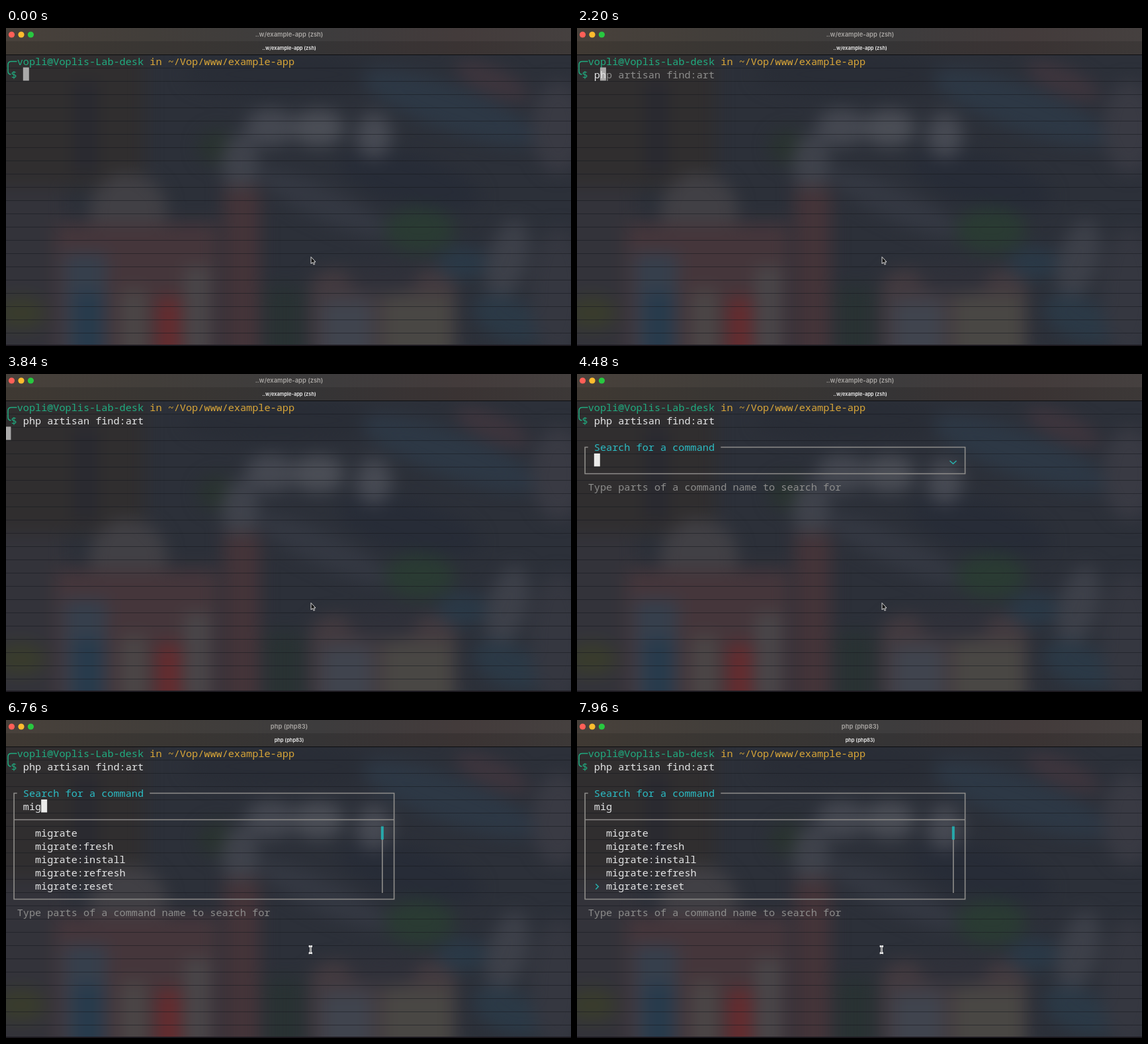
An HTML page that plays this animation: 854 px wide and 480 px high, repeating every 8 s.

```html
<!DOCTYPE html>
<html lang="en">
<head>
<meta charset="utf-8">
<title>Terminal</title>
<style>
  html, body { margin: 0; width: 100%; height: 100%; overflow: hidden; background: #2c3039; }
  svg { display: block; width: 854px; height: 480px; }
  text { white-space: pre; }
  .mono text { font: 15.2px "Noto Sans Mono", "DejaVu Sans Mono", monospace; fill: #e4e5e6; }
  .mono .green { fill: #20ac80; }
  .mono .gold { fill: #d9a638; }
  .mono .cyan { fill: #2bbcc4; }
  .mono .dim { fill: #8d8d8c; }
  .bar text { font-family: Inter, sans-serif; font-weight: 600; text-anchor: middle; }
  .line { fill: none; stroke: #8e8d8a; stroke-width: 1.6; }
  .mark { fill: none; stroke: #27b3ae; stroke-width: 1.5; }
</style>
</head>
<body>
<svg viewBox="0 0 854 480">
  <defs>
    <filter id="soft" filterUnits="userSpaceOnUse" x="-80" y="-40" width="1014" height="600" color-interpolation-filters="sRGB">
      <feGaussianBlur stdDeviation="13"/>
    </filter>
    <linearGradient id="top">
      <stop offset="0" stop-color="#48413b"/>
      <stop offset=".25" stop-color="#423e3a"/>
      <stop offset=".55" stop-color="#3d3c3d"/>
      <stop offset=".8" stop-color="#433b3b"/>
      <stop offset="1" stop-color="#45403f"/>
    </linearGradient>
    <pattern id="rows" width="854" height="20" patternUnits="userSpaceOnUse">
      <path d="M0 .5H854" stroke="#14161c" stroke-opacity=".5"/>
    </pattern>
  </defs>

  <rect width="854" height="480" fill="#2c3039"/>
  <g filter="url(#soft)">
    <rect x="-60" y="-20" width="270" height="260" fill="#302e2f"/>
    <rect x="105" y="80" width="32" height="140" fill="#282930"/>
    <rect x="-60" y="240" width="150" height="260" fill="#33333a"/>
    <ellipse cx="420" cy="70" rx="150" ry="35" fill="#292d36"/>
    <ellipse cx="670" cy="120" rx="140" ry="34" fill="#2d3845" transform="rotate(20 670 120)"/>
    <ellipse cx="735" cy="80" rx="60" ry="20" fill="#3e353d" transform="rotate(24 735 80)"/>
    <ellipse cx="835" cy="150" rx="40" ry="70" fill="#393a43"/>
    <ellipse cx="610" cy="230" rx="110" ry="38" fill="#272c37" transform="rotate(15 610 230)"/>
    <ellipse cx="480" cy="265" rx="110" ry="24" fill="#343842" transform="rotate(25 480 265)"/>
    <ellipse cx="320" cy="180" rx="28" ry="26" fill="#29332f"/>
    <ellipse cx="354" cy="205" rx="28" ry="45" fill="#3f424b"/>
    <ellipse cx="400" cy="150" rx="38" ry="28" fill="#454851"/>
    <ellipse cx="472" cy="151" rx="40" ry="27" fill="#4b4e56"/>
    <ellipse cx="556" cy="162" rx="27" ry="34" fill="#474a53"/>
    <ellipse cx="185" cy="275" rx="58" ry="55" fill="#414045"/>
    <rect x="330" y="240" width="54" height="270" fill="#443439"/>
    <rect x="75" y="295" width="245" height="210" fill="#45363b"/>
    <rect x="88" y="340" width="64" height="170" fill="#363f4c"/>
    <rect x="105" y="400" width="38" height="110" fill="#263a4c"/>
    <rect x="175" y="395" width="36" height="110" fill="#4b4747"/>
    <rect x="270" y="360" width="38" height="145" fill="#494649"/>
    <rect x="230" y="408" width="32" height="100" fill="#682a2d"/>
    <ellipse cx="22" cy="430" rx="38" ry="24" fill="#393c2c"/>
    <rect x="392" y="390" width="58" height="120" fill="#293233"/>
    <rect x="460" y="365" width="220" height="150" rx="30" fill="#433a3f"/>
    <ellipse cx="570" cy="378" rx="55" ry="24" fill="#30313a"/>
    <rect x="478" y="410" width="75" height="100" fill="#40444e"/>
    <rect x="570" y="405" width="105" height="110" fill="#494744"/>
    <ellipse cx="626" cy="305" rx="52" ry="34" fill="#2a3b33"/>
    <ellipse cx="690" cy="355" rx="38" ry="24" fill="#2a3947"/>
    <ellipse cx="758" cy="350" rx="30" ry="62" fill="#3d4049" transform="rotate(15 758 350)"/>
    <ellipse cx="760" cy="440" rx="58" ry="32" fill="#2b3946" transform="rotate(25 760 440)"/>
    <ellipse cx="835" cy="400" rx="42" ry="100" fill="#353740"/>
  </g>
  <rect y="60" width="854" height="420" fill="url(#rows)"/>
  <rect y="478" width="854" height="2" fill="#1d1a20"/>

  <g class="bar">
    <rect width="854" height="40" fill="url(#top)"/>
    <rect y="20" width="854" height="20" fill="#000" fill-opacity=".13"/>
    <rect y="40" width="854" height="1" fill="#0c0d10"/>
    <circle cx="8.5" cy="10" r="4.6" fill="#ff5f57"/>
    <circle cx="23" cy="10" r="4.6" fill="#febc2e"/>
    <circle cx="37.4" cy="10" r="4.6" fill="#28c840"/>
    <text id="title" x="428" y="12.5" font-size="9.4" fill="#aaa7a4"/>
    <text id="tab" x="428" y="33" font-size="7.45" fill="#f2f2f2"/>
  </g>

  <g class="mono">
    <path d="M16.5 50.5H8Q3 50.5 3 55.5V65Q3 70 7.5 70" class="mark" style="stroke:#20ac80"/>
    <text x="16.7" y="56" class="green">vopli@Voplis-Lab-desk</text>
    <text x="217.3" y="56" class="gold">in ~/Vop/www/example-app</text>
    <text x="7.56" y="76" class="green">$</text>
    <rect id="caret" width="9" height="20" fill="#aaa9a9"/>
    <text x="25.8" y="76"><tspan id="typed"></tspan><tspan id="under"></tspan><tspan id="hint" class="dim"></tspan></text>

    <g id="search">
      <path id="frame" class="line"/>
      <text x="25.8" y="116" class="cyan">Search for a command</text>
      <rect id="block" y="120" width="9" height="19.5" fill="#ebebea"/>
      <text id="query" x="25.8" y="136"/>
      <path id="chevron" class="mark" d="M563.5 131L568.5 135.5L573.5 131"/>
      <g id="list">
        <path class="line" d="M12.1 150.5H586.6M568.8 180V261"/>
        <rect x="566.8" y="160.5" width="4" height="20" fill="#27a9ab"/>
        <g id="items"></g>
        <path id="pick" class="mark" d="M28.3 -4L32.3 0L28.3 4"/>
      </g>
      <text id="note" x="16.7" class="dim">Type parts of a command name to search for</text>
    </g>
  </g>

  <path id="arrow" d="M461 345.5V355.8L463.4 353.7L465 357.2L466.6 356.5L465.1 353.1H468Z" fill="#111" stroke="#eee" stroke-width=".9"/>
  <g id="beam" fill="none">
    <path id="beamPath" d="M457.8 341.5Q460.3 341.5 460.3 343.5Q460.3 341.5 462.8 341.5M460.3 343V350.5M457.8 352Q460.3 352 460.3 350Q460.3 352 462.8 352M459 347.5H461.6" stroke="#eee" stroke-width="2.4"/>
    <use href="#beamPath" style="stroke:#111"/>
    <path d="M460.3 342.5V351" stroke="#222" stroke-width=".8"/>
  </g>
</svg>
<script>
  const LOOP = 8000, CELL = 9.12, LEFT = 25.8;
  const command = "php artisan find:art";
  const keys = [2200, 2320, 2440, 2600, 2760, 2920];
  const accept = 3320, enter = 3840, open = 4200, focus = 4760;
  const queryKeys = [5480, 6040, 6320];
  const downKeys = [6960, 7160, 7360, 7560, 7760];
  const lists = {
    m: ["model:prune", "model:show", "make:cache-table", "make:cast", "make:channel"],
    mi: ["migrate", "migrate:fresh", "migrate:install", "migrate:refresh", "migrate:reset"]
  };

  const el = id => document.getElementById(id);
  const passed = (times, t) => times.filter(time => time <= t).length;
  const show = (id, on) => { el(id).style.display = on ? "" : "none"; };
  const write = (id, value) => { if (el(id).textContent !== value) el(id).textContent = value; };

  const rows = lists.m.map((_, i) => {
    const row = document.createElementNS("http://www.w3.org/2000/svg", "text");
    row.setAttribute("x", 44);
    row.setAttribute("y", 176 + i * 20);
    return el("items").appendChild(row);
  });

  function drawPrompt(t) {
    const count = t >= accept ? command.length : passed(keys, t);
    const rest = count ? command.slice(count) : "";
    write("typed", command.slice(0, count));
    write("under", rest.slice(0, 1));
    write("hint", rest.slice(1));

    const waiting = t >= enter;
    show("caret", t < open);
    el("caret").setAttribute("x", waiting ? LEFT - 3 * CELL : LEFT + count * CELL);
    el("caret").setAttribute("y", waiting ? 79.5 : 59.5);
  }

  function drawSearch(t) {
    show("search", t >= open);
    const length = passed(queryKeys, t);
    const chosen = passed(downKeys, t);
    const bottom = length ? 270.5 : 150.5;
    write("query", "mig".slice(0, length));
    show("block", !chosen);
    el("block").setAttribute("x", LEFT + length * CELL);
    el("frame").setAttribute("d", `M16.7 110.5H12.1V${bottom}H586.6V110.5H217.3`);
    el("note").setAttribute("y", length ? 296 : 176);
    show("chevron", !length);
    show("list", length);
    const names = length > 1 ? lists.mi : lists.m;
    rows.forEach((row, i) => {
      if (row.textContent !== names[i]) row.textContent = names[i];
    });
    show("pick", chosen);
    el("pick").setAttribute("transform", `translate(0 ${151.5 + chosen * 20})`);
  }

  function draw() {
    const t = performance.now() % LOOP;
    const focused = t >= focus;
    const title = focused ? "php (php83)" : "..w/example-app (zsh)";
    write("title", title);
    write("tab", title);
    show("arrow", !focused);
    show("beam", focused);
    drawPrompt(t);
    drawSearch(t);
    requestAnimationFrame(draw);
  }
  draw();
</script>
</body>
</html>
```
